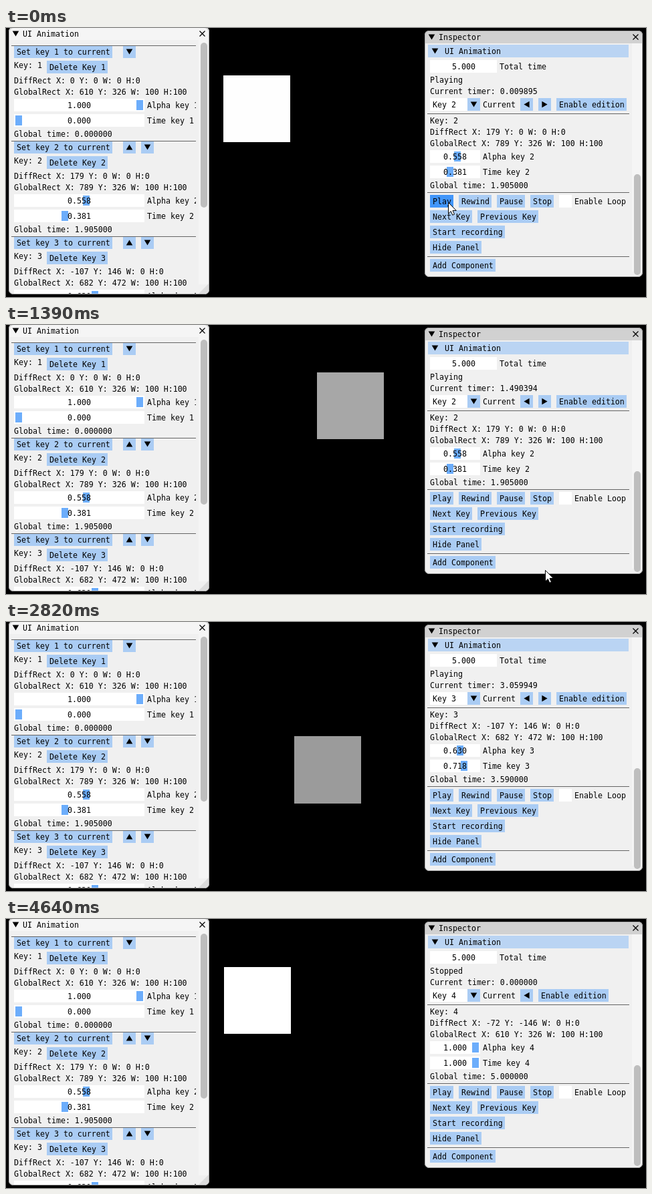
Animation of 957x403 px, one loop 4.67 s. Source, as an HTML page:

```html
<!DOCTYPE html>
<html lang="en">
<head>
<meta charset="utf-8">
<title>UI Animation</title>
<style>
  html, body { margin: 0; width: 100%; height: 100%; overflow: hidden; background: #000; }
  svg { display: block; }
  text { font: 11.627px "DejaVu Sans Mono", monospace; fill: #000; }
  rect { shape-rendering: crispEdges; }
  .round { shape-rendering: auto; }
</style>
</head>
<body>
<svg id="stage" width="957" height="403" viewBox="0 0 957 403">
  <clipPath id="leftClip"><rect x="5" y="18" width="279" height="380"/></clipPath>
  <rect width="957" height="403"/>
  <rect id="box" width="100"/>
  <g id="left"></g>
  <g id="right"></g>
  <g id="live"></g>
  <path id="cursor" d="M0 0V16.5L3.8 13L6.3 18.8L9 17.6L6.5 12H11.8Z" fill="#fff" stroke="#000"/>
</svg>
<script>
const LOOP = 4670, STOP = 4580;
const BLUE = '#aaccf4', HOT = '#4296fa', GRAB = '#6cadfb';
const $ = id => document.getElementById(id);

const KEYS = [
  { x: 610, y: 326, alpha: 1, time: 0 },
  { x: 789, y: 326, alpha: 0.558, time: 0.381 },
  { x: 682, y: 472, alpha: 0.63, time: 0.718 },
  { x: 610, y: 326, alpha: 1, time: 1 }
];
const TOTAL = 5;

// Drawing helpers; c is the middle of a row's text
const rect = (x, y, w, h, fill) => `<rect x="${x}" y="${y}" width="${w}" height="${h}" fill="${fill}"/>`;
const text = (x, c, s) => `<text x="${x}" y="${c + 4}">${s}</text>`;
const line = (x, y, w) => rect(x, y, w, 1, '#646464');
const frame = (x, c, w, fill) => rect(x, c - 10, w, 19, fill);
const button = (x, c, s, fill = BLUE) => frame(x, c, s.length * 7 + 7, fill) + text(x + 4, c, s);
const arrow = (x, y, turn = 0) =>
  `<path d="M-4.8 -4.1H4.8L0 4.1Z" transform="translate(${x} ${y}) rotate(${turn})"/>`;
const arrowButton = (x, c, turn) => frame(x, c, 19, BLUE) + arrow(x + 9.5, c - 0.5, turn);
const cross = (x, y) => `<path d="M${x - 4} ${y - 4}l8 8m0 -8l-8 8" stroke="#000" stroke-width="1.2"/>`;
const grip = (x, y) => `<path d="M${x} ${y - 15}v9q0 6 -6 6h-9z" fill="#dcdcdc"/>`;

function slider(x, c, w, value, label) {
  return frame(x, c, w, '#fff') +
    rect(Math.round(x + 2 + (w - 14) * value), c - 8, 10, 15, GRAB) +
    text(x + Math.floor(w / 2) - 17, c, value.toFixed(3)) + text(x + w + 4, c, label);
}

function panel(x, y, w, h, title, bar) {
  return `<rect class="round" x="${x}" y="${y}" width="${w}" height="${h}" rx="7" fill="#f0f0f0"/>` +
    `<path d="M${x} ${y + 19}v-12q0 -7 7 -7h${w - 14}q7 0 7 7v12z" fill="${bar}"/>` +
    `<rect class="round" x="${x + 0.5}" y="${y + 0.5}" width="${w - 1}" height="${h - 1}" rx="6.5"
      fill="none" stroke="#a8a8a8"/>` +
    arrow(x + 10.5, y + 9.5) + text(x + 21, y + 10, title) + cross(x + w - 10.5, y + 9.5);
}

function scrollbar(x, top, bottom, y, h) {
  return rect(x, top, 15, bottom - top, '#f5f5f5') +
    `<rect class="round" x="${x + 3}" y="${y}" width="10" height="${h}" rx="5" fill="#bebebe"/>`;
}

function rects(i) {
  const k = KEYS[i], p = KEYS[Math.max(0, i - 1)];
  return [
    `DiffRect X: ${k.x - p.x} Y: ${k.y - p.y} W: 0 H:0`,
    `GlobalRect X: ${k.x} Y: ${k.y} W: 100 H:100`
  ];
}
const globalTime = i => 'Global time: ' + (KEYS[i].time * TOTAL).toFixed(6);

function keyBlock(i) {
  const top = 26 + 143 * i, n = i + 1, [diff, global] = rects(i);
  return button(12, top + 10, `Set key ${n} to current`) +
    (i ? arrowButton(175, top + 10, 180) + arrowButton(202, top + 10, 0) : arrowButton(175, top + 10, 0)) +
    line(8, top, 276) +
    text(12, top + 30, 'Key: ' + n) + button(61, top + 33, 'Delete Key ' + n) +
    text(12, top + 53, diff) + text(12, top + 70, global) +
    slider(12, top + 90, 195, KEYS[i].alpha, 'Alpha key ' + n) +
    slider(12, top + 113, 195, KEYS[i].time, 'Time key ' + n) +
    text(12, top + 133, globalTime(i));
}

$('left').innerHTML = panel(4, -1, 300, 400, 'UI Animation', '#f5f5f5') +
  `<g clip-path="url(#leftClip)">${[0, 1, 2].map(keyBlock).join('')}</g>` +
  scrollbar(288, 18, 384, 22, 247) + grip(303, 398);

$('right').innerHTML = panel(626, 4, 326, 369, 'Inspector', '#d1d1d1') +
  frame(631, 35, 300, '#bad4f3') + arrow(641.5, 34.5) + text(656, 35, 'UI Animation') +
  frame(634, 58, 100, '#fff') + text(667, 58, '5.000') + text(738, 58, 'Total time') +
  frame(634, 115, 56, '#fff') + arrowButton(690, 115, 0) + text(713, 115, 'Current') +
  arrowButton(769, 115, 90) +
  line(630, 128, 302) + line(630, 246, 302) +
  button(677, 260, 'Rewind') + button(734, 260, 'Pause') + button(784, 260, 'Stop') +
  frame(827, 260, 19, '#fff') + text(850, 260, 'Enable Loop') +
  button(634, 283, 'Next Key') + button(705, 283, 'Previous Key') +
  button(634, 306, 'Start recording') + button(634, 329, 'Hide Panel') +
  line(630, 342, 302) + button(634, 356, 'Add Component') +
  scrollbar(936, 23, 365, 219, 151);

// Redraw times: [time, number of even steps since the previous entry]
const STEPS = [[50, 1], [440, 7], [500, 1], [520, 1], [580, 1], [1080, 8], [1140, 1], [1390, 5],
  [1440, 1], [1660, 5], [1700, 1], [1880, 4], [1910, 1], [2160, 5], [2260, 1], [2760, 12],
  [2820, 1], [2880, 1], [3300, 9], [3360, 1], [3420, 1], [3470, 1], [3830, 7], [3890, 1],
  [4350, 10], [4430, 1], [4640, 4]];
const times = [0];
for (const [end, n] of STEPS) {
  const from = times[times.length - 1];
  for (let i = 1; i <= n; i++) times.push(from + (end - from) * i / n);
}

const CLOCK = [[0, 0.009895], [440, 0.478502], [1390, 1.490394], [1880, 2.023708],
  [2820, 3.059949], [3420, 3.729534], [STOP, 5.01]];
const MOUSE = [[0, 661, 261], [980, 661, 261], [1390, 806, 367], [1690, 846, 404]];

// Linear interpolation over rows of [time, ...values]
function sample(rows, t) {
  let i = 1;
  while (i < rows.length - 1 && t > rows[i][0]) i++;
  const a = rows[i - 1], b = rows[i];
  const f = Math.min(1, Math.max(0, (t - a[0]) / (b[0] - a[0])));
  return a.slice(1).map((v, j) => v + (b[j + 1] - v) * f);
}

const TRACK = KEYS.map(k => [k.time * TOTAL, k.x - 610, k.y - 326, k.alpha]);

function draw(t) {
  const playing = t < STOP;
  const timer = playing ? sample(CLOCK, t)[0] : 0;
  const key = !playing ? 3 : timer < KEYS[1].time * TOTAL ? 1 : timer < KEYS[2].time * TOTAL ? 2 : 3;

  // The square trails the printed timer slightly
  const [dx, dy] = playing ? sample(TRACK, timer - 0.006) : [1, 1];
  const shade = Math.round(sample(TRACK, timer)[2] * 255);
  const box = $('box');
  box.setAttribute('x', Math.round(325.07 + dx));
  box.setAttribute('y', Math.round(71.1 + dy));
  box.setAttribute('height', dy > 1 ? 101 : 100);
  box.setAttribute('fill', `rgb(${shade},${shade},${shade})`);

  const [mx, my] = sample(MOUSE, t);
  $('cursor').setAttribute('transform', `translate(${Math.round(mx) + 0.5} ${Math.round(my) + 0.5})`);
  const hover = mx < 669 && my < 269;

  const n = key + 1, [diff, global] = rects(key), last = key === 3;
  $('live').innerHTML =
    text(634, 78, playing ? 'Playing' : 'Stopped') +
    text(634, 95, 'Current timer: ' + timer.toFixed(6)) +
    text(638, 115, 'Key ' + n) +
    (last ? '' : arrowButton(796, 115, -90)) + button(last ? 796 : 823, 115, 'Enable edition') +
    text(634, 139, 'Key: ' + n) + text(634, 156, diff) + text(634, 173, global) +
    slider(634, 193, 75, KEYS[key].alpha, 'Alpha key ' + n) +
    slider(634, 216, 75, KEYS[key].time, 'Time key ' + n) +
    text(634, 236, globalTime(key)) +
    button(634, 260, 'Play', hover ? HOT : BLUE);
}

const start = performance.now();
let shown = -1;
function tick() {
  const t = (performance.now() - start) % LOOP;
  let i = times.length - 1;
  while (times[i] > t + 0.01) i--;
  if (i !== shown) draw(times[shown = i]);
  requestAnimationFrame(tick);
}
tick();
</script>
</body>
</html>
```
